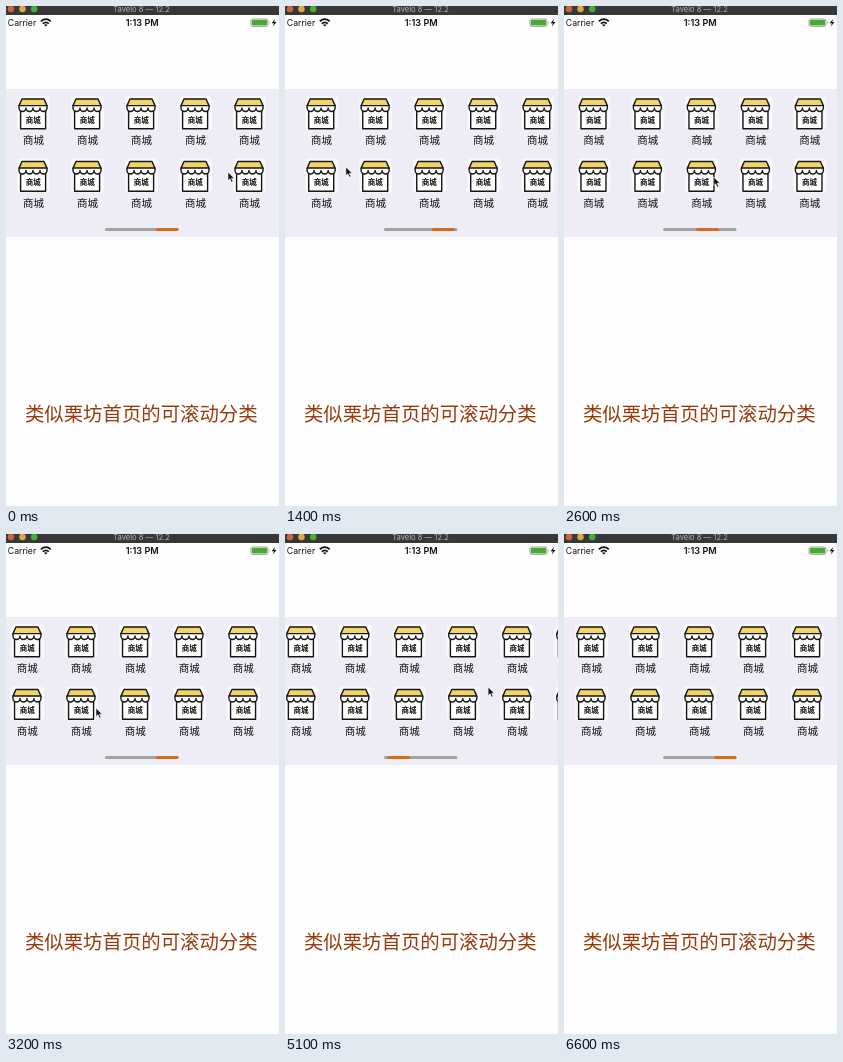
Recreate the animation shown at these times as an HTML page. Size 273 by 500 pixels, loop 6700 ms.

```html
<!DOCTYPE html>
<html lang="zh-CN">
<head>
<meta charset="utf-8">
<title>可滚动分类</title>
<style>
html, body { margin: 0; width: 100%; height: 100%; overflow: hidden; background: #fefefe; }
svg { display: block; width: 100%; height: 100%; }
text { font-family: Inter, Roboto, sans-serif; text-anchor: middle; }
.zh { font-family: "Noto Sans CJK SC", "Noto Sans CJK", sans-serif; }
</style>
</head>
<body>
<svg viewBox="0 0 273 500">
  <defs>
    <g id="shop">
      <rect x="-16" y="-1" width="33" height="34" rx="4" fill="#f8f7fb"/>
      <g stroke="#151515" stroke-width="1.4" stroke-linejoin="round">
        <path d="M-12.4 12V31.7H12.6V12" fill="#fff"/>
        <path d="M-11 2H11L14 8.6H-14Z" fill="#f3d468"/>
        <path d="M-14 8.6H14V11a3.5 3.5 0 0 1-7 0a3.5 3.5 0 0 1-7 0a3.5 3.5 0 0 1-7 0a3.5 3.5 0 0 1-7 0Z" fill="#fff"/>
      </g>
      <text class="zh" x=".2" y="25.7" font-size="7.5" font-weight="900" fill="#111">商城</text>
      <text class="zh" x=".4" y="47.3" font-size="10.5" fill="#111">商城</text>
    </g>
  </defs>

  <rect width="273" height="500" fill="#fefefe"/>
  <rect width="273" height="9" fill="#38383b"/>
  <circle cx="5" cy="3" r="3.3" fill="#cb663c"/>
  <circle cx="16.5" cy="3" r="3.3" fill="#e0aa40"/>
  <circle cx="28.2" cy="3" r="3.3" fill="#48ae34"/>
  <text x="135.5" y="6" font-size="7.6" fill="#b4b4b6">Tavelo 8 — 12.2</text>

  <text x="16" y="20" font-size="8.7" fill="#111">Carrier</text>
  <g fill="none" stroke="#111" stroke-width="1.7">
    <path d="M34.8 15.4Q39.8 11 44.8 15.4M36.8 17.6Q39.8 15 42.8 17.6"/>
    <path d="M38 18.7Q39.8 17.6 41.6 18.7L39.8 20.5Z" fill="#111" stroke="none"/>
  </g>
  <text x="136.2" y="20" font-size="9.1" font-weight="600" fill="#111">1:13 PM</text>
  <rect x="244.9" y="12.9" width="17.2" height="7.6" rx="1.8" fill="none" stroke="#8a8a8a" stroke-width=".7"/>
  <rect x="245.8" y="13.8" width="15.4" height="5.8" rx=".8" fill="#4aa838"/>
  <path d="M263 15.3q1.2 1.3 0 2.7Z" fill="#8a8a8a"/>
  <path d="M269 13L265.6 17.3H267.9L266.8 20.6L270.5 16H268.2Z" fill="#111"/>

  <rect y="83" width="273" height="148" fill="#eeedf5"/>
  <g id="list"></g>
  <rect x="99" y="222" width="73.5" height="3" rx="1.5" fill="#a1a1a6"/>
  <rect id="thumb" y="222" width="22.5" height="3" rx="1.5" fill="#d86a1a"/>

  <text class="zh" x="135.3" y="415" font-size="19.4" fill="#983a0c">类似栗坊首页的可滚动分类</text>
  <path id="cursor" d="M0 0V8.6L2 6.8L3.5 10.2L5 9.5L3.5 6.3H6.2Z" fill="#111" stroke="#fff" stroke-width=".6"/>
</svg>
<script>
const LOOP = 6700, STEP = 100, COLUMNS = 8, PITCH = 54, END = 162;
const PULL = 17.5, REACH = 140;

// Moments of the widest swipe to the first column, and of the widest pull past the last one
const swipes = [900, 2247, 5000], pulls = [3380, 4300, 5800];

// Where the pointer drifts between swipes: time, x, y
const drift = [
  [100, 222, 166], [1400, 53, 161], [2000, 112, 168], [3200, 90, 174],
  [4300, 97, 170], [5800, 53, 139], [6500, -12, 126], [LOOP, -12, 126]
];

const byId = id => document.getElementById(id);
const list = byId('list'), thumb = byId('thumb'), cursor = byId('cursor');

for (let i = 0; i < COLUMNS * 2; i++) {
  const x = 27 + (i >> 1) * PITCH, y = 91 + (i % 2) * 62.5;
  list.innerHTML += `<use href="#shop" x="${x}" y="${y}"/>`;
}

// Smooth rise from 0 to 1 and back around each peak
function bumps(t, peaks, half) {
  return peaks.reduce((sum, peak) => {
    const u = Math.min(1, Math.abs(t - peak) / half);
    return sum + Math.cos(u * Math.PI / 2) ** 2;
  }, 0);
}

function driftAt(t) {
  const next = drift.findIndex(p => p[0] > t);
  const a = drift[next - 1], b = drift[next];
  const u = (t - a[0]) / (b[0] - a[0]);
  const ease = u * u * (3 - 2 * u);
  return a.map((v, i) => v + (b[i] - v) * ease);
}

function draw(now) {
  const t = Math.max(STEP, Math.floor(now % LOOP / STEP) * STEP);
  const away = bumps(t, swipes, 590);
  const scroll = END * (1 - away) + PULL * bumps(t, pulls, 300);
  const [, x, y] = driftAt(t);
  list.setAttribute('transform', `translate(${-scroll})`);
  thumb.setAttribute('x', 99 + 51 * Math.min(1, scroll / END));
  cursor.setAttribute('transform', `translate(${x + REACH * away} ${y})`);
}

const start = performance.now();
function tick() {
  draw(performance.now() - start);
  requestAnimationFrame(tick);
}
tick();
</script>
</body>
</html>
```
